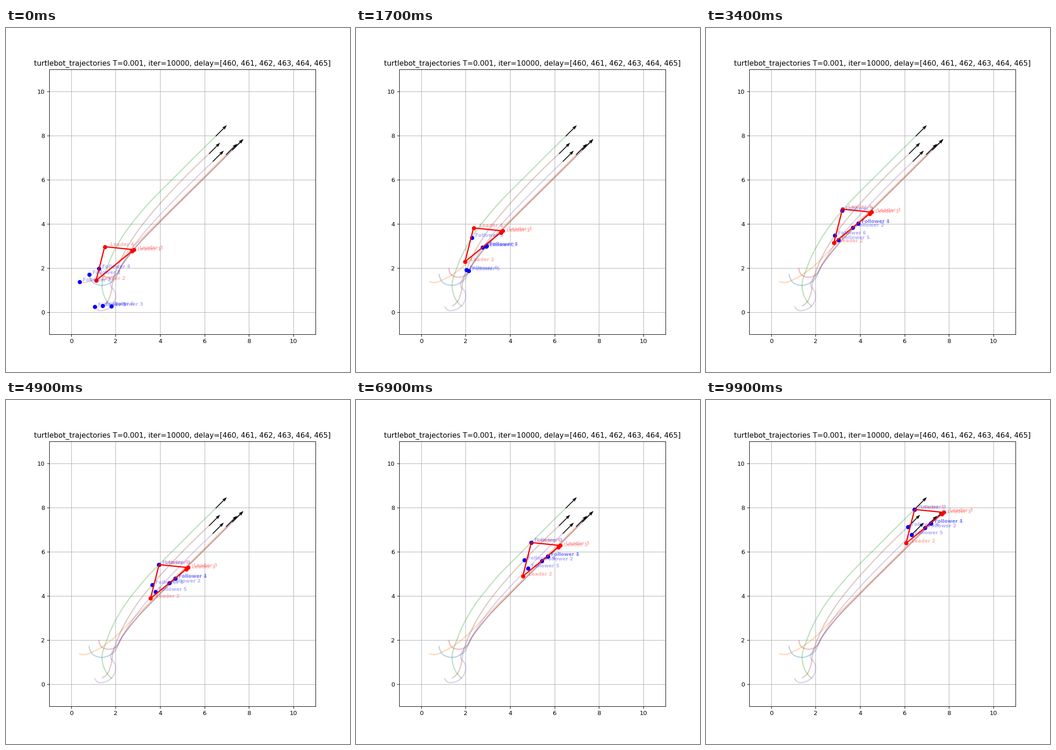
Animation of 748 by 748 pixels, one loop 10 s. Source, as a matplotlib script:

```python
import numpy as np
import matplotlib.pyplot as plt
from matplotlib.animation import FuncAnimation

FRAMES = 100
STEP = 0.05    # leader advance per frame on both axes
FINAL_RUN = 1.7  # length of the last straight diagonal, on both axes

# Leaders 1..4 at the start, and the order in which the outline joins them
LEADERS = np.array([(2.73, 2.755), (1.12, 1.432), (2.81, 2.828), (1.505, 2.963)])
OUTLINE = [0, 1, 3, 2, 0]

# Shared by the two followers that end up side by side
LANE = [(2.28, 2.12), (2.91, 2.95), (3.92, 4.015), (7.247, 7.337)]


def smooth(points, samples=800):
    """Smooth curve through the points, ending in a diagonal run."""
    p = np.array(points)
    p = np.insert(p, -1, p[-1] - FINAL_RUN, axis=0)
    t = np.r_[0, np.cumsum(np.hypot(*np.diff(p, axis=0).T))]
    m = np.gradient(p, t, axis=0, edge_order=2)
    u = np.linspace(0, t[-1], samples)
    i = np.clip(np.searchsorted(t, u, side="right") - 1, 0, len(t) - 2)
    h = (t[i + 1] - t[i])[:, None]
    s = (u - t[i])[:, None] / h
    return ((1 + 2 * s) * (1 - s) ** 2 * p[i] + s * (1 - s) ** 2 * h * m[i]
            + s * s * (3 - 2 * s) * p[i + 1] + s * s * (s - 1) * h * m[i + 1])


def follower(points, settle, power=1):
    """Path and position per frame: the lag behind the leaders dies away."""
    path = smooth(points)
    dist = np.r_[0, np.cumsum(np.hypot(*np.diff(path, axis=0).T))]
    k = np.arange(FRAMES)
    cruise = STEP * np.sqrt(2)
    lag = dist[-1] - cruise * FRAMES
    travel = dist[-1] - cruise * (FRAMES - k) - lag * np.exp(-(k / settle) ** power)
    return path, np.column_stack([np.interp(travel, dist, c) for c in path.T])


followers = [
    follower([(.805, 1.703), (.98, 1.34), (1.41, 1.21), (1.87, 1.40)] + LANE, 8),
    follower([(.377, 1.369), (.60, 1.34), (1.05, 1.50), (1.80, 1.985),
              (2.778, 2.953), (6.968, 7.127)], 5),
    follower([(1.815, .265), (1.535, .61), (1.39, 1.14), (1.63, 2.07),
              (2.24, 3.317), (3.182, 4.577), (6.502, 7.965)], 8.8),
    follower([(1.246, 1.973), (1.37, 1.68), (1.72, 1.58), (2.01, 1.68)] + LANE, 9),
    follower([(1.06, .245), (1.18, .10), (1.58, .12), (1.94, .45), (1.97, .91),
              (1.775, 1.19), (2.115, 1.848), (3.016, 3.265), (3.803, 4.192),
              (6.368, 6.815)], 14.5),
    follower([(1.41, .285), (1.60, .44), (1.795, .89), (1.87, 1.39),
              (2.16, 2.22), (2.84, 3.453), (3.627, 4.484), (6.202, 7.17)], 26, 1.6),
]

fig, ax = plt.subplots(figsize=(8, 8), dpi=93.5)
ax.set(xlim=(-1, 11), ylim=(-1, 11))
ax.grid(True)
delays = list(range(460, 466))
ax.set_title(f"turtlebot_trajectories T=0.001, iter=10000, delay={delays}")

for n, (path, _) in enumerate(followers):
    ax.plot(*path.T, color=f"C{n}", alpha=0.3, lw=2)

ends = np.array([path[-1] for path, _ in followers])
speed = np.full(len(ends), 0.5)
ax.quiver(*ends.T, speed, speed, angles="xy", scale_units="xy", scale=1,
          width=0.003, headwidth=4, headlength=6, headaxislength=5.2, zorder=1.8)

leader_dots, = ax.plot([], [], "o", color="red")
follower_dots, = ax.plot([], [], "o", color="blue")
outline, = ax.plot([], [], color="red", lw=2)


def make_labels(name, count, color):
    return [ax.text(0, 0, f"{name} {n + 1}", color=color, alpha=0.3,
                    fontsize=8, fontweight="bold") for n in range(count)]


leader_labels = make_labels("Leader", len(LEADERS), "red")
follower_labels = make_labels("Follower", len(followers), "blue")


def place(labels, points, dx):
    for label, (x, y) in zip(labels, points):
        label.set_position((x + dx, y + 0.03))


def update(k):
    lead = LEADERS + STEP * k
    follow = np.array([pos[k] for _, pos in followers])
    leader_dots.set_data(*lead.T)
    follower_dots.set_data(*follow.T)
    outline.set_data(*lead[OUTLINE].T)
    place(leader_labels, lead, 0.25)
    place(follower_labels, follow, 0.15)
    return [leader_dots, follower_dots, outline, *leader_labels, *follower_labels]


anim = FuncAnimation(fig, update, frames=FRAMES, interval=100,
                     repeat=True, repeat_delay=0)
plt.show()
```
